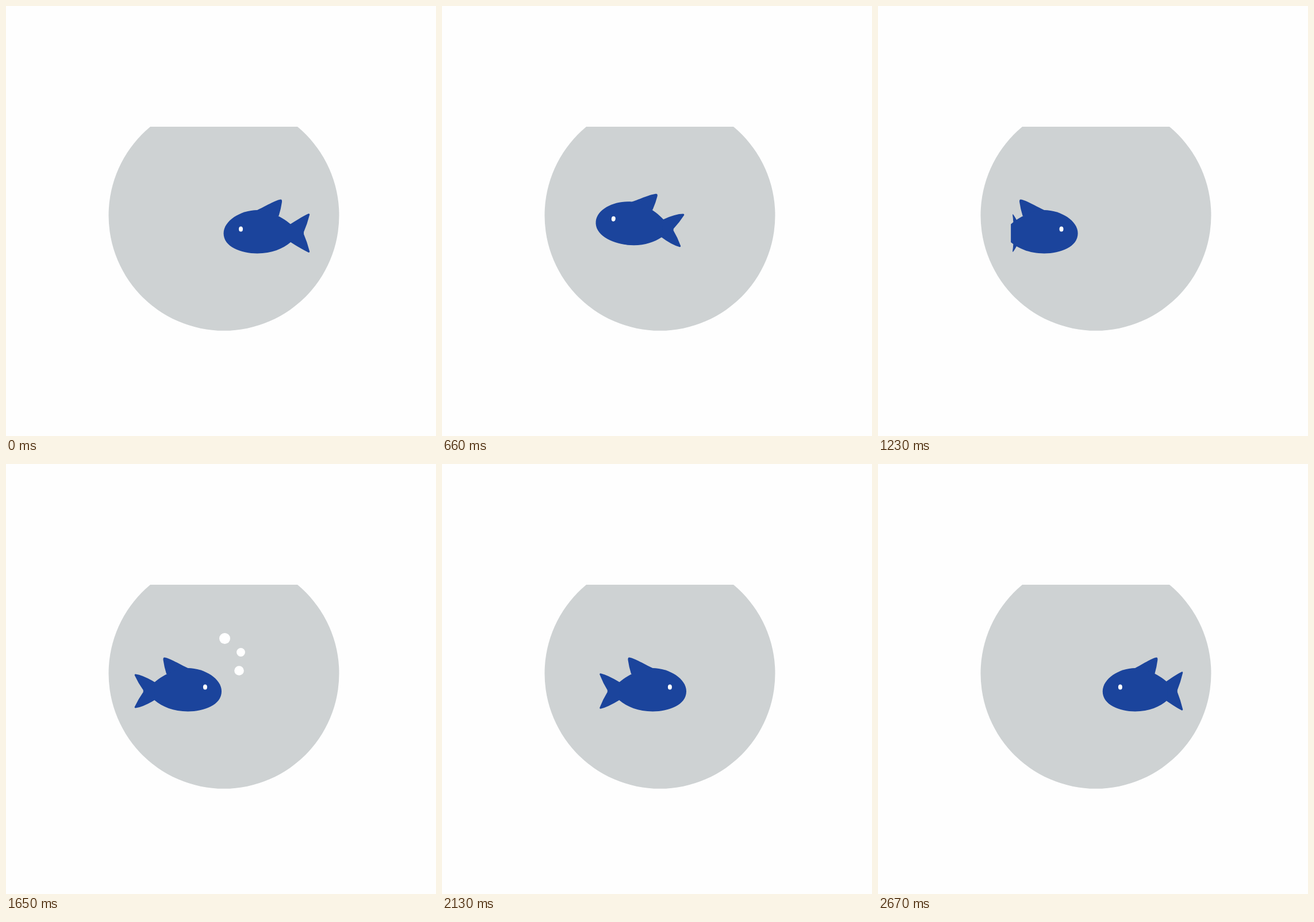
These frames come from a looping animation (748 by 748 pixels, 2.7 s). An HTML page:

```html
<!DOCTYPE html>
<html lang="en">
<head>
<meta charset="utf-8">
<title>Fish bowl</title>
<style>
  html, body { margin: 0; width: 100%; height: 100%; overflow: hidden; background: #fefefe; }
  svg { display: block; width: 100vw; height: 100vh; }
  .fish { fill: #1b449c; }
  .white { fill: #fff; }
  #tail { stroke: #1b449c; stroke-width: 3; stroke-linejoin: round; }
</style>
</head>
<body>
<svg viewBox="0 0 748 748">
  <path fill="#ced2d3" d="M251 210H507A200.5 200.5 0 1 1 251 210Z"/>
  <g id="bubbles" class="white">
    <circle r="9.5"/>
    <circle cx="-28" cy="24" r="7.4"/>
    <circle cx="-25" cy="56" r="8.3"/>
  </g>
  <g id="fish" class="fish">
    <path id="tail"/>
    <path id="fin" d="M0 -40C13 -46 32 -57.500 41 -58.500Q43.500 -58.500 43 -54Q41.500 -43 37.500 -30L10 -20Z"/>
    <ellipse cy="-2.2" rx="36" ry="37.3"/>
    <path id="body" d="M-58.500 .5C-58.500 -21.500 -29 -39.700 0 -40C16 -40 40 -31 58 -15.500V16C45 27 25 35.500 0 35.500C-28 35.500 -58.500 24 -58.500 .5Z"/>
    <ellipse id="eye" class="white" cy="-7" rx="3.5" ry="4.5"/>
  </g>
</svg>
<script>
const LOOP = 2700, STEP = 30, HALF = LOOP / 2, LEFT_END = 1180;
const el = id => document.getElementById(id);
const [fish, body, fin, tail, eye, bubbles] =
  ['fish', 'body', 'fin', 'tail', 'eye', 'bubbles'].map(el);
const { PI, abs, sin, cos, sqrt, floor, sign } = Math;
const ramp = (t, from, span) => Math.max(0, Math.min(1, (t - from) / span));
const place = (node, transform) => node.setAttribute('transform', transform);

// 1 looks left, -1 looks right; the tail turns late at the left wall.
const facing = (t, from) =>
  t < 2400 ? cos(PI * ramp(t, from, 400)) : -cos(PI * ramp(t, 2480, 220));

const swim = t => t < LEFT_END
  ? 437 - 149 * sin(PI / 2 * t / LEFT_END) ** 1.12
  : 288 + 28.5 * ((t - LEFT_END) / 470) ** 1.44;

// The tail fin closes and opens once per half loop, weaker on the way back.
function flap(t) {
  const u = (t % HALF) / HALF;
  return (t < HALF ? 1 : .72) * sin(PI * sqrt(u));
}

function tailPath(close) {
  const x = 51.7 + 2.2 * close, y = 32.3 - 6 * close, notch = 41.5 - 4.5 * close;
  const bend = (x + notch) / 2 + 1;
  return `M0 -4L20 -14Q41 ${1.5 * close - 27.5} ${x} ${-y}` +
    `Q${bend} ${-y / 2} ${notch} -2V2Q${bend} ${y / 2} ${x} ${y}` +
    `Q41 ${27.5 - 1.5 * close} 20 14L0 4Z`;
}

function drawFish(t) {
  const turn = facing(t, 800), tailTurn = facing(t, 989);
  const x = swim(t) + 22 * sqrt(1 - turn * turn);
  const u = ramp(t, 0, 1060);
  const y = 395 - 15.3 * sin(PI * u ** 1.88);
  const tilt = 105.4 * u * (1 - u) ** 2.4;
  const wide = sign(turn) * (.62 + .38 * abs(turn));

  place(fish, `translate(${x} ${y}) rotate(${tilt})`);
  place(body, `scale(${wide} 1)`);
  place(fin, `scale(${turn} 1)`);
  place(tail, `translate(${38 * turn} 0) scale(${tailTurn} 1)`);
  tail.setAttribute('d', tailPath(flap(t)));
  eye.setAttribute('cx', .7 - 29.2 * turn);
}

const puffs = [
  { at: 300, x: 359.3, y: 291, flip: 1, tilt: 13.5, dx: -20, dy: -12 },
  { at: 1650, x: 380.5, y: 303.5, flip: -1, tilt: 0, dx: 14, dy: -6 }
];

function drawBubbles(t) {
  const p = puffs[floor(t / HALF)], age = t - p.at;
  const x = p.x + p.dx * age / 240;
  const rise = 1 - (1 - ramp(age, 0, 240)) ** 2;
  const y = p.y + p.dy * rise + Math.max(0, -age / 12);
  const size = ramp(age, -150, 100) * (1 - ramp(age, 240, 60));
  place(bubbles, `translate(${x} ${y}) rotate(${p.tilt}) scale(${p.flip * size} ${size})`);
}

const start = performance.now();
function tick() {
  const t = floor((performance.now() - start) % LOOP / STEP) * STEP;
  drawFish(t);
  drawBubbles(t);
  requestAnimationFrame(tick);
}
tick();
</script>
</body>
</html>
```
